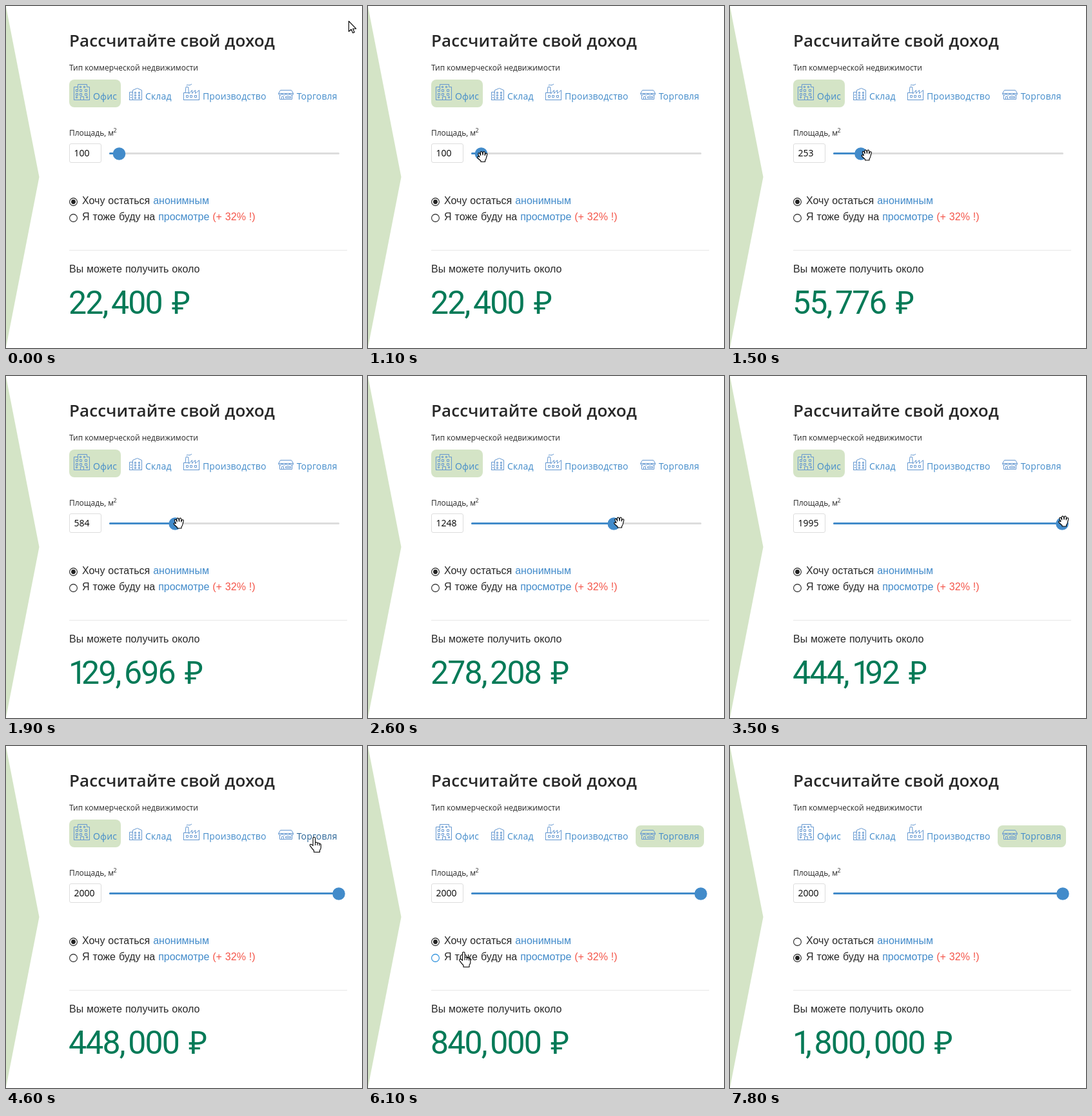
Animation of 552x530 px, one loop 7900 ms. Source, as an HTML page:

```html
<!DOCTYPE html>
<html lang="ru">
<head>
<meta charset="utf-8">
<title>Калькулятор дохода</title>
<style>
  html, body { margin: 0; width: 100%; height: 100%; overflow: hidden; background: #fff; }
  svg { display: block; }
  text { white-space: pre; fill: #282828; font: 16px "Liberation Sans", Arial, sans-serif; word-spacing: .5px; }
  .title { font: 600 26px "Open Sans", sans-serif; letter-spacing: .06px; word-spacing: 0; }
  .label { font: 12px "Open Sans", sans-serif; word-spacing: 0; }
  .sup { font: 9px "Open Sans", sans-serif; }
  .tab { font: 14px "Open Sans", sans-serif; letter-spacing: .13px; fill: #428bca; }
  .tab.hover { fill: #2a6496; }
  .area { font: 14px "Open Sans", sans-serif; fill: #000; }
  .link { fill: #428bca; }
  .bonus { fill: #f4564a; }
  .sum { font: 50px Roboto, sans-serif; font-kerning: none; fill: #047a57; letter-spacing: -.037em; word-spacing: 4.5px; }
  .one { letter-spacing: -.162em; }
  .comma { letter-spacing: .074em; }
  .ruble { font-family: "Open Sans", "Noto Sans", sans-serif; }
  .icon { fill: none; stroke: #6497d0; stroke-width: 1; }
  .cursor path { fill: #fff; stroke: #000; stroke-width: 1.1; stroke-linejoin: round; }
</style>
</head>
<body>
<svg width="552" height="530" viewBox="0 0 552 530">
  <path d="M0 1L51.5 265L0 529z" fill="#d4e4c6"/>
  <text class="title" x="98" y="63">Рассчитайте свой доход</text>
  <text class="label" x="98" y="100">Тип коммерческой недвижимости</text>

  <rect id="mark" rx="8" fill="#d4e4c6"/>
  <g class="icon" transform="translate(105 121)">
    <path d="M0 24.5H25M.5 24V4.5H6.5M6.5 8V.5H20.5V4.5H24.5V24M10.5 24V19.5H15.5V24"/>
    <path id="officePanes"/>
  </g>
  <g class="icon" transform="translate(191 126)">
    <path d="M0 19.5H20M.5 19V7.5H5.5M5.5 19V4.5L12.5 1.5L19.5 4.5V19"/>
    <path id="storePanes"/>
  </g>
  <g class="icon" transform="translate(275 121)">
    <path d="M0 24.5H25M.5 24V13.5H3L4 4.5H7.5L8.5 13.5V15L13.5 9.5V14.5L18.5 9.5V14.5L24.5 9.5V24M5 2.5Q5 .5 7.5 1.5T13 0M.5 13.5H8.5"/>
    <path id="plantPanes"/>
  </g>
  <g class="icon" transform="translate(422 130)">
    <path d="M3.5 .5H20.5L23.5 5.5H.5zM.5 5.5Q.5 8 3 8T6 5.5Q6 8 9 8T12 5.5Q12 8 15 8T18 5.5Q18 8 21 8T23.5 5.5M2.5 8V14.5H21.5V8M5.5 14V10.5H8.5V14M11.5 10.5H19.5V12.5H11.5z"/>
  </g>
  <text class="tab" x="135" y="145">Офис</text>
  <text class="tab" x="216" y="145">Склад</text>
  <text class="tab" x="305" y="145">Производство</text>
  <text class="tab" id="shop" x="450.7" y="145">Торговля</text>

  <text class="label" x="98" y="201">Площадь, м</text>
  <text class="sup" x="166.5" y="196">2</text>
  <rect x="98.5" y="213.5" width="49" height="29" rx="2.5" fill="#fff" stroke="#ddd"/>
  <text class="area" id="area" x="105.5" y="233"></text>
  <rect x="160" y="227" width="357" height="3" rx="1.5" fill="#ddd"/>
  <rect id="fill" x="160" y="227" height="3" rx="1.5" fill="#428bca"/>
  <circle id="knob" cy="229" r="9.8" fill="#428bca"/>

  <g id="radio1"><circle cx="104.5" cy="303.5" r="5.9" stroke-width="1.1"/><circle cx="104.5" cy="303.5" r="3.4"/></g>
  <g id="radio2"><circle cx="104.5" cy="328.5" r="5.9" stroke-width="1.1"/><circle cx="104.5" cy="328.5" r="3.4"/></g>
  <text x="118" y="307">Хочу остаться <tspan class="link">анонимным</tspan></text>
  <text x="118" y="332">Я тоже буду на <tspan class="link">просмотре</tspan> <tspan class="bonus">(+ 32% !)</tspan></text>

  <rect x="98" y="378" width="431" height="1" fill="#e7e7e7"/>
  <text x="98" y="413">Вы можете получить около</text>
  <text class="sum" id="sum" x="97" y="477"></text>

  <g class="cursor" id="cursor">
    <path id="arrow" d="M.5 .5V16.5L4.2 13.1L6.8 18.8L9.3 17.7L6.8 12.2H11.8z"/>
    <path id="grab" transform="translate(-8.5 -8.5)" d="M4 9L2 5Q1.5 3 3 2.7Q4.2 2.7 5 4.7L5.7 6.5L5.3 2.5Q5.3 .7 6.6 .5Q8.1 .5 8.4 2.5L9 6L9.3 2.3Q9.5 .5 10.9 .5Q12.3 .6 12.3 2.4L12.2 6.5L13 4.3Q13.6 2.9 14.8 3.3Q16.1 3.8 15.7 5.3L14.5 10Q14 13 12.5 14.5V16.5H6V15Q4 13.5 1 10.5Q0 8.9 1.3 8.5Q2.3 8.2 4 9z"/>
    <path id="point" transform="translate(-7.5 0)" d="M5.5 13.5V2A1.8 1.8 0 0 1 9.1 2V8.5Q12 7.6 12.4 9.5Q15.2 8.7 15.5 10.5Q17.8 10.1 17.8 12V16.5Q17.8 18.5 16 20.5V23.5H7V21Q4 18 1 13.6Q0 11.5 1.8 11.2Q3.5 11.2 5.5 13.5zM9.1 8.5V13M12.4 9.5V13M15.5 10.5V13.5"/>
  </g>
</svg>
<script>
const LOOP = 7900;
const $ = id => document.getElementById(id);

// Grid of small square windows as path data
function panes(cols, rows, size) {
  return rows.map(y => cols.map(x => `M${x} ${y}h${size}v${size}h${-size}z`).join('')).join('');
}
$('officePanes').setAttribute('d', panes([3.5, 9.5, 17.5], [8.5, 14.5], 3) + panes([3.5, 19.5], [19.5], 2) + panes([9.5, 15.5], [3.5], 2));
$('storePanes').setAttribute('d', panes([8.5, 14.5], [7.5, 11.5, 15.5], 2) + panes([2.5], [11.5, 15.5], 1));
$('plantPanes').setAttribute('d', panes([4.5, 10.5, 17.5], [17.5], 3));

// Keys: time, cursor x, cursor y
const path = [
  [0, 531, 23], [600, 171.5, 235.5], [700, 171.5, 235.5], [1100, 177.5, 233.5],
  [1500, 212, 231], [1900, 268, 228], [2300, 333.5, 228], [2600, 389.5, 227],
  [3100, 478.5, 226], [3500, 517.5, 225], [3600, 523.5, 225], [3900, 523.5, 225],
  [4600, 478, 141], [5400, 478, 141], [6100, 148.5, 319], [6900, 148.5, 319], [7500, 60, 545]
];
// Keys: time, floor area, area already counted in the sum
const areas = [
  [1100, 100, 100], [1500, 253, 249], [1900, 584, 579], [2300, 940, 934],
  [2600, 1248, 1242], [3100, 1749, 1740], [3500, 1995, 1983], [3600, 2000, 2000]
];
// Cursor shape from the given time on
const shapes = [
  [0, 'arrow'], [600, 'grab'], [4000, 'arrow'], [4500, 'point'],
  [5600, 'arrow'], [6000, 'point'], [7100, 'arrow'], [7500, '']
];

const smooth = u => u * u * (3 - 2 * u);

function sample(keys, t, i, ease = u => u) {
  const next = keys.findIndex(k => k[0] > t);
  if (next === 0) return keys[0][i];
  if (next < 0) return keys[keys.length - 1][i];
  const a = keys[next - 1], b = keys[next];
  return a[i] + (b[i] - a[i]) * ease((t - a[0]) / (b[0] - a[0]));
}

function setAttrs(el, attrs) {
  for (const name in attrs) el.setAttribute(name, attrs[name]);
}

function setRadio(el, on, color, back) {
  const [ring, dot] = el.children;
  setAttrs(ring, { stroke: color, fill: back });
  setAttrs(dot, { fill: color, visibility: on ? 'visible' : 'hidden' });
}

function showSum(value) {
  const digits = String(value).replace(/\B(?=(\d{3})+$)/g, ',');
  const markup = digits.replace(/[1,]/g, c => `<tspan class="${c === '1' ? 'one' : 'comma'}">${c}</tspan>`);
  $('sum').innerHTML = markup + ' <tspan class="ruble">₽</tspan>';
}

function draw(t) {
  const shop = t >= 5100, viewing = t >= 6700;
  setAttrs($('mark'), shop
    ? { x: 415, y: 123, width: 106, height: 34 }
    : { x: 98, y: 114, width: 80, height: 43 });
  $('shop').classList.toggle('hover', t >= 4500 && t < 5600);

  const area = Math.round(sample(areas, t, 1));
  const counted = Math.round(sample(areas, t, 2));
  const x = 175.5 + (area - 100) * .1792;
  $('area').textContent = area;
  setAttrs($('knob'), { cx: x });
  setAttrs($('fill'), { width: x - 160 });
  showSum(counted * (viewing ? 900 : shop ? 420 : 224));

  const hover = t >= 6100 && t < 7800, pressed = t >= 6500 && t < 6700;
  setRadio($('radio1'), !viewing, '#222', '#fff');
  setRadio($('radio2'), viewing, hover ? '#1a86d9' : '#222', pressed ? '#cce4f7' : '#fff');

  const ease = t > 1100 && t < 3600 ? undefined : smooth;
  setAttrs($('cursor'), { transform: `translate(${sample(path, t, 1, ease)} ${sample(path, t, 2, ease)})` });
  const shape = shapes.filter(s => s[0] <= t).pop()[1];
  for (const id of ['arrow', 'grab', 'point']) $(id).style.display = id === shape ? '' : 'none';
}

const start = performance.now();
let last = -1;
function tick() {
  const t = Math.floor(((performance.now() - start) % LOOP) / 100) * 100;
  if (t !== last) draw(last = t);
  requestAnimationFrame(tick);
}
tick();
</script>
</body>
</html>
```
